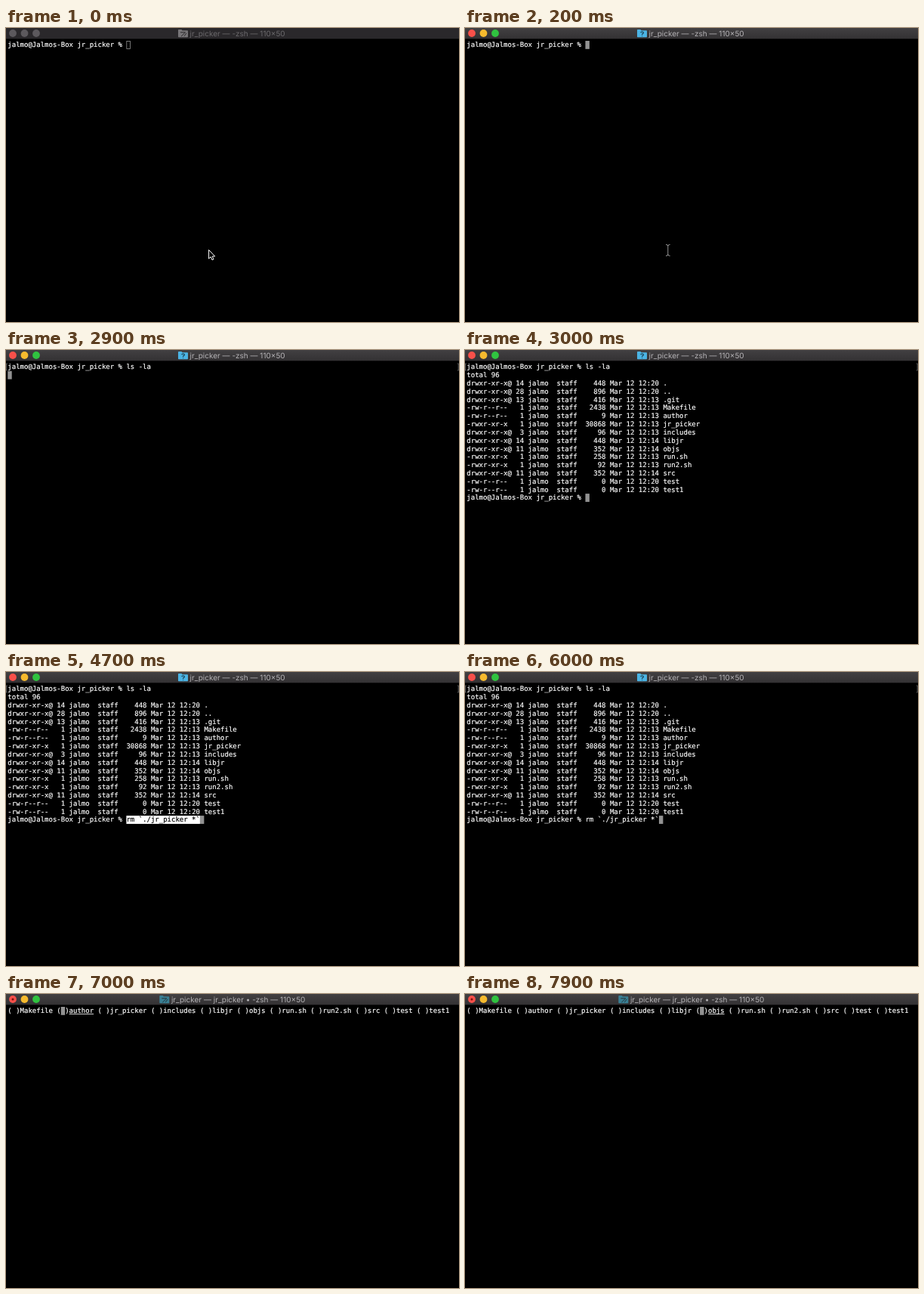
These frames come from a looping animation (600x389 px, 8000 ms). An HTML page:

```html
<!DOCTYPE html>
<html lang="en">
<head>
<meta charset="utf-8">
<title>Terminal</title>
<style>
  html, body { margin: 0; width: 100%; height: 100%; overflow: hidden; background: #000; }
  svg { display: block; width: 100vw; height: 100vh; }
  text { white-space: pre; text-rendering: geometricPrecision; }
  .mono { font: 9px "DejaVu Sans Mono", monospace; fill: #fff; stroke: #fff; stroke-width: .18px; }
  .inverse { fill: #000; stroke: #000; }
  .title { font: 10px Inter, sans-serif; }
</style>
</head>
<body>
<svg id="stage" viewBox="0 0 600 389"></svg>
<script>
const LOOP = 8000;
const COL = 5.418, ROW = 10.82, LEFT = 2.3, TOP = 17;
const USER = 'jalmo', TOOL = 'jr_picker';
const PROMPT = `${USER}@Jalmos-Box ${TOOL} % `;
const PASTE = `rm \`./${TOOL} *\``;
const stage = document.getElementById('stage');

// mode, links, size, time, name
const LISTING = [
  ['drwxr-xr-x@', 14, 448, '12:20', '.'],
  ['drwxr-xr-x@', 28, 896, '12:20', '..'],
  ['drwxr-xr-x@', 13, 416, '12:13', '.git'],
  ['-rw-r--r--', 1, 2438, '12:13', 'Makefile'],
  ['-rw-r--r--', 1, 9, '12:13', 'author'],
  ['-rwxr-xr-x', 1, 30868, '12:13', TOOL],
  ['drwxr-xr-x@', 3, 96, '12:13', 'includes'],
  ['drwxr-xr-x@', 14, 448, '12:14', 'libjr'],
  ['drwxr-xr-x@', 11, 352, '12:14', 'objs'],
  ['-rwxr-xr-x', 1, 258, '12:13', 'run.sh'],
  ['-rwxr-xr-x', 1, 92, '12:13', 'run2.sh'],
  ['drwxr-xr-x@', 11, 352, '12:14', 'src'],
  ['-rw-r--r--', 1, 0, '12:20', 'test'],
  ['-rw-r--r--', 1, 0, '12:20', 'test1']
];
const CHOICES = LISTING.slice(3).map(entry => entry[4]);
const LINES = ['total 96', ...LISTING.map(([mode, links, size, time, name]) =>
  `${mode.padEnd(11)} ${String(links).padStart(2)} ${USER}  staff  ${String(size).padStart(5)} Mar 12 ${time} ${name}`)];

const KEY_TIMES = [1400, 1500, 1600, 1900, 2000, 2700];
const MOVE_TIMES = [6800, 7200, 7400, 7500, 7600];
const passed = (times, t) => times.filter(at => t >= at).length;

const x = col => LEFT + col * COL;
const y = row => TOP + row * ROW;
const rect = (left, top, w, h, attrs) =>
  `<rect x="${left}" y="${top}" width="${w}" height="${h}" ${attrs}/>`;
const circle = (cx, cy, r, fill) => `<circle cx="${cx}" cy="${cy}" r="${r}" fill="${fill}"/>`;
const write = (row, str, col = 0, cls = '') =>
  `<text class="mono ${cls}" x="${x(col)}" y="${y(row) + 8.3}">${str}</text>`;
const block = (row, col) => rect(x(col), y(row), COL, ROW, 'fill="#929292"');

function folder(left, color, ink, asked) {
  const mark = asked
    ? `<path d="M4.6 4.2Q6.6 2.4 8.2 3.9Q8.8 5.4 6.6 6.3V7.2M6.6 8.4V9.2" fill="none" stroke="${ink}" stroke-width="1.1"/>`
    : `<path d="M3 4H9.5L4 9.3M8 9L11 5" fill="none" stroke="${ink}" stroke-width="1"/>`;
  return `<g transform="translate(${left} 1.8)">
    <path d="M0 1Q0 .2 .8 .2H4.4L5.6 1.4H12.2Q13 1.4 13 2.2V9.6Q13 10.4 12.2 10.4H.8Q0 10.4 0 9.6Z" fill="${color}"/>${mark}</g>`;
}

function titleBar(active, running) {
  const lights = active ? ['#f8504a', '#f6ba2e', '#30c340'] : Array(3).fill('#5c595d');
  const iconX = running ? 203.3 : 228;
  const label = `${TOOL} — ${running ? TOOL + ' • ' : ''}-zsh — 110×50`;
  const icon = !active ? folder(iconX, '#777578', '#2b292c', false)
    : running ? folder(iconX, '#397f94', '#24333a', false)
    : folder(iconX, '#4bb4e4', '#173746', true);
  return rect(0, 0, 600, 14.3, `fill="${active ? 'url(#bar)' : '#2a282b'}"`)
    + lights.map((fill, i) => circle(9 + 15.5 * i, 7, 4.9, fill)).join('')
    + (running ? circle(9, 7, 1.5, '#7c120d') : '')
    + icon
    + `<text class="title" x="${iconX + 15.6}" y="10.8" fill="${active ? '#b5b3b6' : '#6b696c'}">${label}</text>`;
}

function pointer(t) {
  if (t < 200) {
    return `<path d="M268.6 293.6V305.2L271.2 302.8L273 306.9L275 306L273.2 302.1H276.7Z"
      fill="#000" stroke="#fff" stroke-width="1"/>`;
  }
  return t < 1400
    ? `<path d="M266 286.5Q268.8 286.5 268.8 288.5Q268.8 286.5 271.6 286.5M268.8 288.5V299.5M266 301.5Q268.8 301.5 268.8 299.5Q268.8 301.5 271.6 301.5"
        fill="none" stroke="#bbb" stroke-width=".8"/>`
    : '';
}

const lineMarks = row => `<path d="M1.8 ${y(row) + 1}H.6V${y(row) + 10}H1.8M598 ${y(row) + 1}H599.2V${y(row) + 10}H598"
  fill="none" stroke="#777" stroke-width=".8"/>`;

function shell(t) {
  const typed = 'ls -la'.slice(0, passed(KEY_TIMES, t));
  const first = write(0, PROMPT + typed);
  const end = PROMPT.length;
  if (t < 100) return first + rect(x(end) + .4, y(0) + .4, COL - .8, ROW - .8, 'fill="none" stroke="#929292" stroke-width=".8"');
  if (t < 2900) return first + block(0, end + typed.length);
  if (t < 3000) return lineMarks(0) + first + block(1, 0);

  const row = LINES.length + 1;
  const paste = t < 4700 ? '' : PASTE;
  const highlighted = paste && t < 6000;
  return lineMarks(0) + first
    + LINES.map((line, i) => write(i + 1, line)).join('')
    + write(row, PROMPT)
    + (highlighted ? rect(x(end), y(row), paste.length * COL, ROW, 'fill="#fff"') : '')
    + write(row, paste, end, highlighted ? 'inverse' : '')
    + block(row, end + paste.length);
}

function picker(t) {
  const current = passed(MOVE_TIMES, t);
  let col = 0, out = '';
  CHOICES.forEach((name, i) => {
    if (i === current) {
      out += block(0, col + 1)
        + rect(x(col + 3), y(0) + 9.2, name.length * COL, .8, 'fill="#fff"');
    }
    out += write(0, `( )${name}`, col);
    col += name.length + 4;
  });
  return out;
}

function render(t) {
  return `<defs><linearGradient id="bar" x2="0" y2="1">
      <stop stop-color="#424042"/><stop offset="1" stop-color="#333133"/></linearGradient></defs>`
    + rect(0, 0, 600, 389, 'fill="#000"')
    + titleBar(t >= 100, t >= 6200)
    + (t < 6100 ? shell(t) : picker(t))
    + pointer(t);
}

let shown = '';
function tick() {
  const markup = render(performance.now() % LOOP);
  if (markup !== shown) stage.innerHTML = shown = markup;
  requestAnimationFrame(tick);
}
tick();
</script>
</body>
</html>
```
